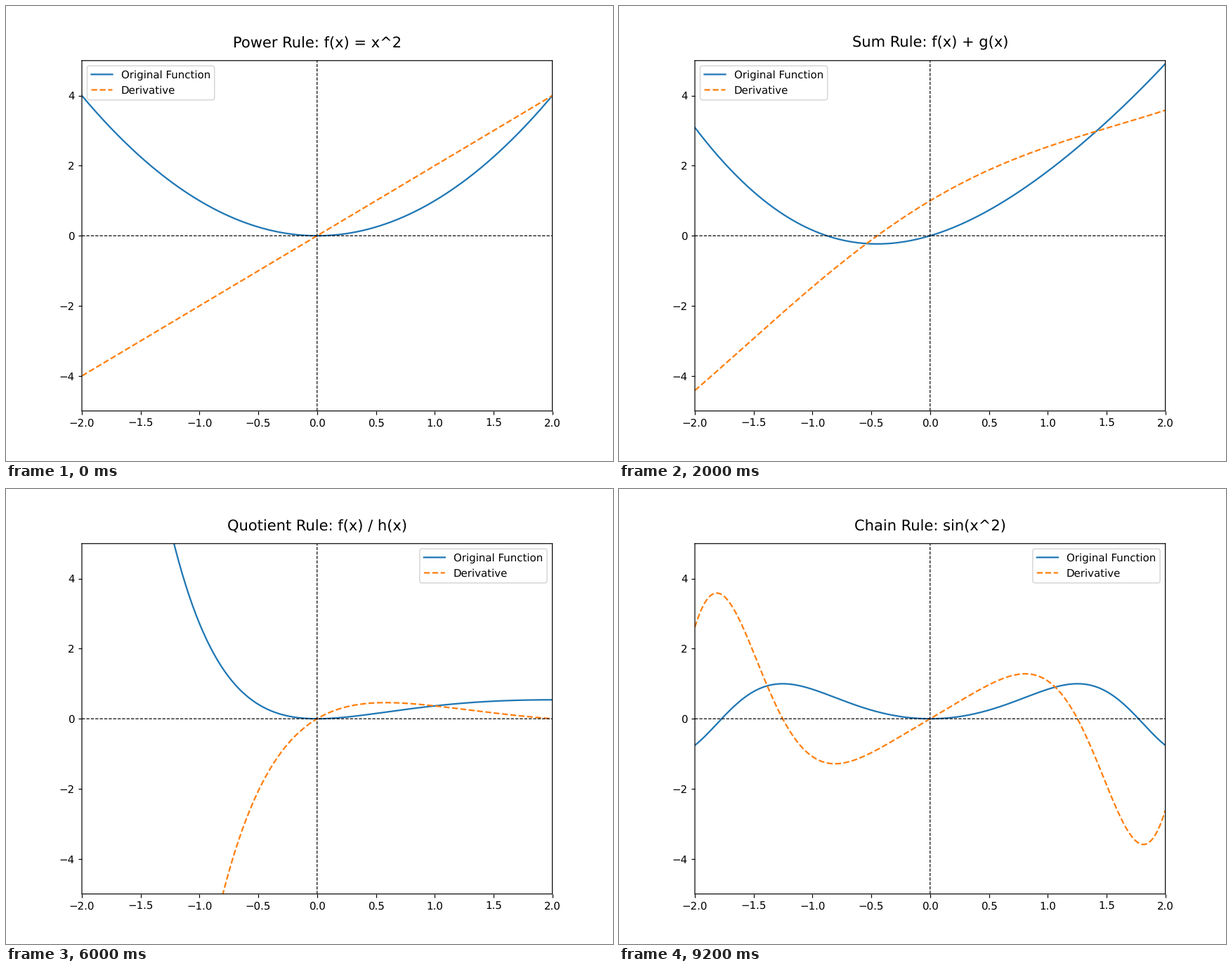
A matplotlib script that plays this animation: 864 px wide and 648 px high, repeating every 10000 ms.

```python
import numpy as np
import matplotlib.pyplot as plt
from matplotlib.animation import FuncAnimation

# Soft, unsnapped edges for spines, ticks and zero lines
plt.rcParams.update({
    "font.family": "DejaVu Sans",
    "path.snap": False,
    "text.hinting": "none",
})

x = np.linspace(-2, 2, 400)

# title, function, derivative, legend corner
RULES = [
    ("Power Rule: f(x) = x^2", x**2, 2 * x, "upper left"),
    ("Sum Rule: f(x) + g(x)", x**2 + np.sin(x), 2 * x + np.cos(x), "upper left"),
    ("Product Rule: f(x) * g(x)", x**2 * np.sin(x),
     2 * x * np.sin(x) + x**2 * np.cos(x), "upper right"),
    ("Quotient Rule: f(x) / h(x)", x**2 * np.exp(-x),
     (2 * x - x**2) * np.exp(-x), "upper right"),
    ("Chain Rule: sin(x^2)", np.sin(x**2), 2 * x * np.cos(x**2), "upper right"),
]

fig, ax = plt.subplots(figsize=(8, 6), dpi=108)


def draw(i):
    title, func, deriv, corner = RULES[i]
    ax.clear()
    ax.plot(x, func, label="Original Function")
    ax.plot(x, deriv, "--", label="Derivative")
    ax.axhline(0, color="black", lw=0.8, ls="--")
    ax.axvline(0, color="black", lw=0.8, ls="--")
    ax.set(xlim=(-2, 2), ylim=(-5, 5))
    ax.set_title(title, fontsize=14, y=1.02)
    ax.legend(loc=corner).get_frame().set_snap(False)
    return []


anim = FuncAnimation(fig, draw, frames=len(RULES), init_func=lambda: [],
                     interval=2000, repeat=True, repeat_delay=0)
plt.show()
```
